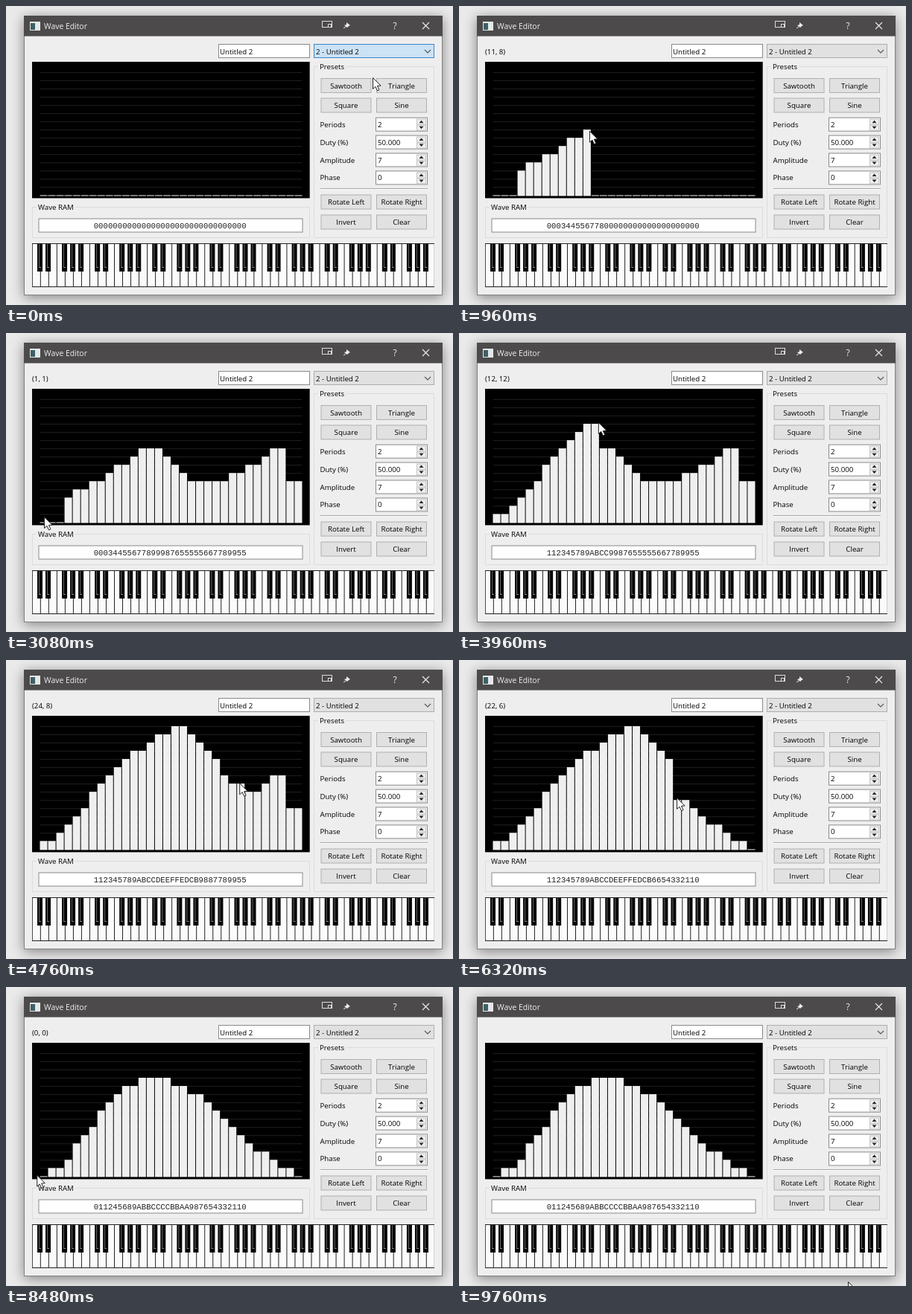
Write an HTML page with a canvas that moves like this. It is 600 px wide and 402 px high and loops after 10000 ms.

```html
<!DOCTYPE html>
<html lang="en">
<head>
<meta charset="utf-8">
<title>Wave Editor</title>
<style>
  html, body { margin: 0; height: 100%; overflow: hidden; background: #ebeaeb; }
  canvas { display: block; }
</style>
</head>
<body>
<canvas id="stage" width="600" height="402"></canvas>
<script>
const ctx = document.getElementById('stage').getContext('2d');
const LOOP = 10000, STEP = 40, LAG = 15;
const LEFT = 45.5, BASE = 254.4, CELL = 11.03, COUNT = 32;

const clamp = (v, lo, hi) => Math.max(lo, Math.min(hi, v));

// Piecewise linear curve through points [x, ...values], sorted by x
function curve(points, x) {
  const next = points.findIndex(point => point[0] > x);
  if (next < 1) return points.at(next).slice(1);
  const a = points[next - 1], b = points[next];
  const k = (x - a[0]) / (b[0] - a[0]);
  return a.slice(1).map((v, i) => v + (b[i + 1] - v) * k);
}

// Each drag follows a level curve over the columns; speed is columns per second.
// A column keeps the level at which the pointer leaves it.
const strokes = [
  { start: 640, from: 2, to: 31, speed: 27.3,
    levels: [[3, 2.97], [12, 8.55], [14, 9], [18, 5], [22, 5], [27, 8.1], [28, 9.3], [29, 9.3], [30, 5]] },
  { start: 3100, from: -.5, to: 31, speed: 14.32,
    levels: [[0, .8], [1, 1.15], [10, 10.9], [17, 15.49], [23, 8.15], [31, 3.2]] },
  { start: 5558, from: 31.5, to: 0, speed: 12,
    levels: [[0, 0], [3, 2.2], [8, 9.2], [9, 10.05], [12, 11.6], [15, 11.6], [19, 9.6], [24, 4.55], [31, 0]] }
];
for (const s of strokes) {
  s.dir = Math.sign(s.to - s.from);
  s.end = s.start + Math.abs(s.to - s.from) / s.speed * 1000;
  s.edge = s.dir > 0 ? 1 : 0;
}

const progress = (s, t) => s.from + s.dir * s.speed * (clamp(t, s.start, s.end) - s.start) / 1000;
const levelAt = (s, p) => curve(s.levels, p)[0];
const column = x => clamp(Math.floor((x - LEFT) / CELL), 0, COUNT - 1);
const columnAt = (s, p) => clamp(Math.floor(p + s.edge), 0, COUNT - 1);

function strokePoint(s, t) {
  const p = progress(s, t);
  return [LEFT + (p + s.edge) * CELL, BASE - levelAt(s, p) * CELL];
}

// Free pointer stops between the drags: time, x, y
const stops = [
  [0, 492, 97], [2140, 462, 215], [3080, 51, 248],
  [9120, 32, 252], [9320, 32, 252], [9760, 522, 397],
  ...strokes.flatMap(s => [s.start, s.end].map(t => [t, ...strokePoint(s, t)]))
].sort((a, b) => a[0] - b[0]);

const activeStroke = t => strokes.find(s => t >= s.start && t <= s.end);

function pointer(t) {
  const s = activeStroke(t);
  return s ? strokePoint(s, t) : curve(stops, t);
}

function waveAt(t) {
  const wave = Array(COUNT).fill(0);
  for (const s of strokes) {
    if (t < s.start) break;
    const p = progress(s, t - LAG), last = columnAt(s, p);
    for (let i = columnAt(s, s.from); (last - i) * s.dir >= 0; i += s.dir) {
      const left = s.dir > 0 ? Math.min(p, i) : Math.max(p, i);
      wave[i] = Math.round(levelAt(s, left));
    }
  }
  return wave;
}

function rect(x, y, w, h, fill) {
  ctx.fillStyle = fill;
  ctx.fillRect(x, y, w, h);
}

function box(x, y, w, h, fill, border) {
  rect(x, y, w, h, border);
  rect(x + 1, y + 1, w - 2, h - 2, fill);
}

function text(s, x, y, { color = '#000', font = '9.7px "Open Sans", sans-serif', align = 'left' } = {}) {
  ctx.font = font;
  ctx.textAlign = align;
  ctx.fillStyle = color;
  ctx.fillText(s, x, y);
}

function lines(color, width, ...polylines) {
  ctx.strokeStyle = color;
  ctx.lineWidth = width;
  ctx.beginPath();
  for (const points of polylines) points.forEach(([x, y], i) => i ? ctx.lineTo(x, y) : ctx.moveTo(x, y));
  ctx.stroke();
}

function shape(points, fill) {
  ctx.beginPath();
  points.forEach(([x, y]) => ctx.lineTo(x, y));
  ctx.closePath();
  ctx.fillStyle = fill;
  ctx.fill();
}

function titleBar() {
  rect(24, 13, 562, 27.6, '#4c4a4b');
  rect(32, 21, 14, 12, '#e4e8e8');
  rect(33, 23, 6, 9, '#3d6068');
  text('Wave Editor', 51, 31, { color: '#f0f0f0', font: '10.4px "Open Sans", sans-serif' });
  ctx.strokeStyle = '#ddd';
  ctx.lineWidth = 1;
  ctx.strokeRect(424.5, 20.5, 13, 8);
  rect(432, 24, 5, 5, '#ddd');
  rect(433, 25, 3, 3, '#4c4a4b');
  shape([[457, 22], [462, 26], [460, 27], [458, 29], [454, 26], [457, 25]], '#eee');
  lines('#eee', 1, [[456, 28], [453, 30]]);
  text('?', 522, 31, { color: '#eee', font: '12px "Open Sans", sans-serif', align: 'center' });
  lines('#eee', 1.1, [[559, 22], [568, 31]], [[568, 22], [559, 31]]);
}

function group(title, x, y, w, h, gap) {
  ctx.strokeStyle = '#dcdcdc';
  ctx.lineWidth = 1;
  ctx.strokeRect(x + .5, y + .5, w - 1, h - 1);
  rect(x + 6, y - 2, gap, 5, '#efeeef');
  text(title, x + 8, y + 4.3);
}

function button(label, x, y) {
  box(x, y, 68, 20, '#e1e1e1', '#b0b0b0');
  text(label, x + 34, y + 13.5, { align: 'center' });
}

function spinner(label, value, y) {
  text(label, 421.5, y + 13);
  box(496, y, 70, 19, '#fff', '#8a8a8a');
  text(value, 499, y + 13);
  for (const dy of [2, 10]) box(551, y + dy, 13, 8, '#eee', '#c4c4c4');
  shape([[554.5, y + 7.5], [557.5, y + 4], [560.5, y + 7.5]], '#222');
  shape([[554.5, y + 12], [557.5, y + 15.5], [560.5, y + 12]], '#222');
}

function keyboard() {
  const pitch = 540 / 49;
  rect(35, 319, 540, 59, '#222');
  for (let i = 0; i < 49; i++) rect(35.8 + i * pitch, 320, pitch - 1, 57, '#fbfbfb');
  for (let i = 0; i < 49; i++) {
    if (i % 7 === 2 || i % 7 === 6) continue;
    const x = 42 + i * pitch;
    rect(x, 320, 7, 37, '#050505');
    rect(x + 2, 320, 1, 31, '#666');
    rect(x + 2, 351, 3, 1, '#888');
  }
}

function presets(t) {
  const fade = Math.min(1, t / 200);
  const mix = (a, b) => `rgb(${a.map((v, i) => Math.round(v + (b[i] - v) * fade))})`;
  box(413, 51, 162, 19, mix([204, 226, 245], [225, 225, 225]), mix([60, 135, 200], [173, 173, 173]));
  text('2 - Untitled 2', 416, 65);
  lines('#555', 1.1, [[562, 59], [566, 63], [570, 59]]);
  group('Presets', 413, 81, 162, 231, 37);
  [['Sawtooth', 'Triangle', 97], ['Square', 'Sine', 123.5],
   ['Rotate Left', 'Rotate Right', 253.5], ['Invert', 'Clear', 280.5]].forEach(([a, b, y]) => {
    button(a, 422.5, y);
    button(b, 497, y);
  });
  [['Periods', '2'], ['Duty (%)', '50.000'], ['Amplitude', '7'], ['Phase', '0']]
    .forEach(([label, value], i) => spinner(label, value, 149.7 + i * 23.9));
  rect(422, 245, 144, 1, '#a5a5a5');
  rect(422, 246, 144, 1, '#fff');
}

function graph(wave) {
  rect(35, 75, 372.7, 183.4, '#000');
  for (let level = 1; level <= 15; level++) rect(LEFT, BASE - level * CELL, COUNT * CELL - 1, 1, '#202020');
  wave.forEach((level, i) => {
    const h = level * CELL;
    rect(LEFT + i * CELL, BASE - h, CELL - 1, h + 1, '#f0eff0');
  });
}

function coordinates(t, wave) {
  const s = activeStroke(t);
  const [x, y] = pointer(t - LAG);
  if (!s && (x < 35 || x > 407 || y < 75 || y > 258)) return;
  const i = s ? columnAt(s, progress(s, t - LAG)) : column(x);
  const level = s ? wave[i] : clamp(Math.round((BASE - y) / CELL), 0, 15);
  text(`(${i}, ${level})`, 35, 65);
}

function arrow([x, y]) {
  ctx.save();
  ctx.translate(x + .5, y - .5);
  shape([[0, 0], [0, 15], [3.4, 11.8], [6, 17.4], [8.4, 16.3], [5.9, 10.9], [10.6, 10.6]], '#fff');
  ctx.strokeStyle = '#222';
  ctx.lineWidth = 1;
  ctx.stroke();
  ctx.restore();
}

function draw(t) {
  const wave = waveAt(t);
  rect(0, 0, 600, 402, '#ebeaeb');
  ctx.save();
  ctx.shadowColor = 'rgba(0,0,0,.45)';
  ctx.shadowBlur = 16;
  ctx.shadowOffsetY = 3;
  rect(24, 13, 562, 376, '#808080');
  ctx.restore();
  rect(25, 40, 560, 348, '#efeeef');
  titleBar();
  box(285, 51, 123, 19, '#fff', '#8a8a8a');
  text('Untitled 2', 287, 65);
  coordinates(t, wave);
  presets(t);
  graph(wave);
  group('Wave RAM', 35, 270, 373, 42, 52);
  box(43.5, 285.5, 355, 19, '#fff', '#8a8a8a');
  const digits = wave.map(level => level.toString(16).toUpperCase()).join('');
  text(digits, 117.7, 299, { color: '#222', font: '10.68px "Liberation Mono", monospace' });
  keyboard();
  arrow(pointer(t));
}

const began = performance.now();
function tick() {
  const t = (performance.now() - began) % LOOP;
  draw(Math.floor(t / STEP) * STEP);
  requestAnimationFrame(tick);
}
tick();
</script>
</body>
</html>
```
